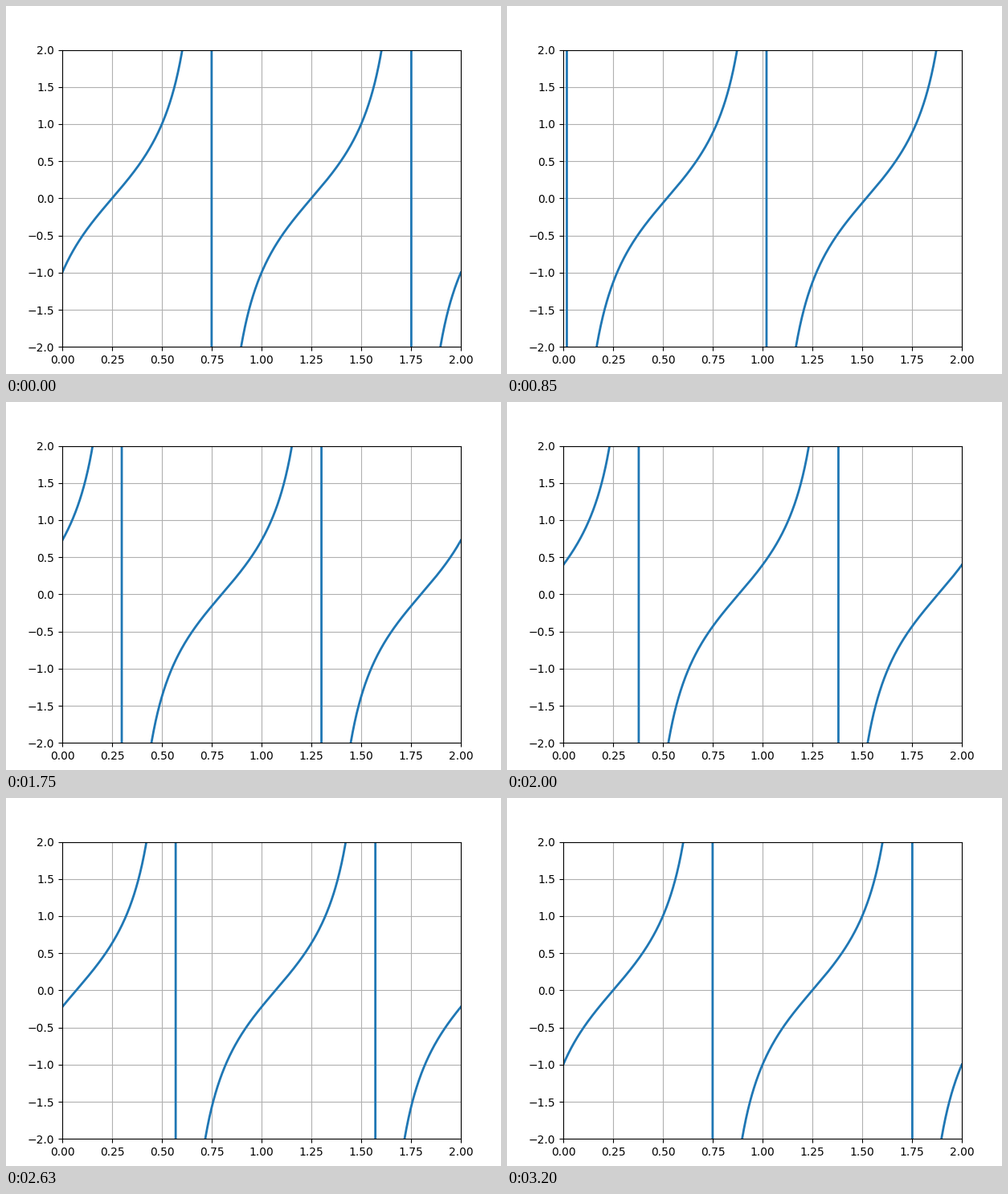
These frames come from a looping animation (616x458 px, 3.24 s). A matplotlib script:

```python
import numpy as np
import matplotlib.pyplot as plt
from matplotlib.animation import FuncAnimation

W, H, DPI = 616, 458, 100
INTERVAL = 20      # ms per drawn frame
FRAMES = 162       # 3240 ms loop
STEP_MS = 32.1     # time the wave rests on each step
STEPS = 100        # steps of 0.01 make one full period

fig = plt.figure(figsize=(W / DPI, H / DPI), dpi=DPI)
ax = fig.add_axes([70 / W, 33.8 / H, 496 / W, 369.6 / H])
ax.set_xlim(0, 2)
ax.set_ylim(-2, 2)
ax.grid(True)

x = np.linspace(0, 2, 1000)
line, = ax.plot([], [], lw=2)


def wave(step):
    return np.tan(np.pi * (x - 0.25 - 0.01 * step))


def update(i):
    step = min(int((i * INTERVAL + 29) / STEP_MS), STEPS)
    line.set_data(x, wave(step))
    return line,


def init():
    return update(0)


anim = FuncAnimation(fig, update, frames=FRAMES, init_func=init,
                     interval=INTERVAL, repeat=True, repeat_delay=0)
plt.show()
```
